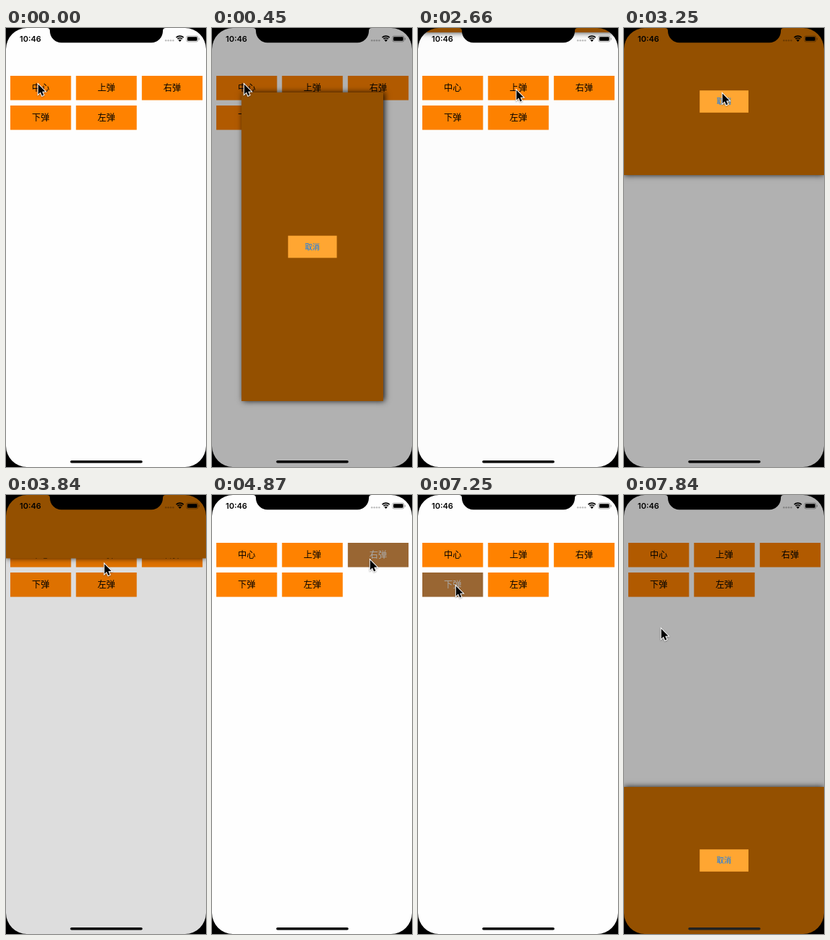
These frames come from a looping animation (278x606 px, 7990 ms). An HTML page with a canvas:

```html
<!DOCTYPE html>
<html lang="zh-CN">
<head>
<meta charset="utf-8">
<title>弹窗</title>
<style>
html, body { margin: 0; width: 100%; height: 100%; overflow: hidden; background: #000; }
canvas { display: block; width: 278px; height: 606px; }
</style>
</head>
<body>
<canvas id="stage"></canvas>
<script>
const W = 278, H = 606;
const LOOP = 7990, TICK = 147.96, LAST = 53;
const SLIDE = 1.25; // slide length in ticks
const CJK = '"Noto Sans CJK SC", "Noto Sans CJK", sans-serif';

const canvas = document.getElementById('stage');
const ctx = canvas.getContext('2d');
const dpr = window.devicePixelRatio || 1;
canvas.width = W * dpr;
canvas.height = H * dpr;

// press: tick at which the button is held down
const buttons = [
  { label: '中心', x: 6, y: 66 },
  { label: '上弹', x: 97.3, y: 66, press: 17 },
  { label: '右弹', x: 188.8, y: 66, press: 33 },
  { label: '下弹', x: 6, y: 107, press: 49 },
  { label: '左弹', x: 97.3, y: 107 }
];

// dx, dy: direction each panel slides in from; all times in ticks
const panels = [
  { x: 41, y: 89, w: 197, h: 426, dx: 0, dy: 0, open: 1.4, close: 9.33 },
  { x: 0, y: 0, w: W, h: 203, dx: 0, dy: -1, open: 17.847, close: 25.33 },
  { x: 144, y: 0, w: 134, h: H, dx: 1, dy: 0, open: 33.847, close: 43.33 },
  { x: 0, y: 403, w: W, h: 203, dx: 0, dy: 1, open: 49, close: 99 }
];

// cursor path: tick, x, y
const path = [
  [4, 43, 76], [8, 136, 293], [10, 136, 296], [16, 135, 84],
  [21, 135, 84], [23, 135, 93.5], [27, 135, 93.5], [32, 218, 88],
  [37, 218, 88], [39, 207, 269], [41, 208, 297], [44, 208, 297],
  [48.6, 51, 124], [52, 51, 124], [53, 50, 183]
];

const clamp = v => Math.max(0, Math.min(1, v));
const ease = v => v < 0.5 ? 2 * v * v : 1 - 2 * (1 - v) * (1 - v);
const smooth = v => v * v * (3 - 2 * v);
const held = (k, at) => Math.abs(k - at) < 0.5;
const progress = (k, p) =>
  ease(clamp((k - p.open) / SLIDE)) - ease(clamp((k - p.close) / SLIDE));

function rect(x, y, w, h, color) {
  ctx.fillStyle = color;
  ctx.fillRect(x, y, w, h);
}

function pill(x, y, w, h, r, color) {
  ctx.beginPath();
  ctx.roundRect(x, y, w, h, r);
  ctx.fillStyle = color;
  ctx.fill();
}

function text(str, x, y, font, color) {
  ctx.font = font;
  ctx.fillStyle = color;
  ctx.textAlign = 'center';
  ctx.textBaseline = 'alphabetic';
  ctx.fillText(str, x, y);
}

function drawButton(b, k) {
  const down = held(k, b.press);
  rect(b.x, b.y, 84.4, 33.6, down ? '#996633' : '#ff8200');
  text(b.label, b.x + 42.2, b.y + 21.4, '12.2px ' + CJK, down ? '#aaa' : '#000');
}

function drawPanel(p, k) {
  const v = progress(k, p);
  if (v <= 0) return;
  const fades = !p.dx && !p.dy;
  const x = p.x + p.dx * p.w * (1 - v);
  const y = p.y + p.dy * p.h * (1 - v);
  const cx = x + p.w / 2, cy = y + p.h / 2;

  rect(0, 0, W, H, `rgba(0,0,0,${0.305 * v})`);
  ctx.save();
  if (fades) ctx.globalAlpha = v;
  ctx.save();
  ctx.shadowColor = 'rgba(0,0,0,0.85)';
  ctx.shadowBlur = 8 * dpr;
  ctx.shadowOffsetX = fades ? 2 * dpr : 0;
  rect(x, y, p.w, p.h, '#945000');
  ctx.restore();
  rect(cx - 33.8, cy - 15.3, 67.8, 30.6, '#ffa632');
  if (held(k, p.close - 0.33)) ctx.globalAlpha *= 0.2;
  text('取消', cx, cy + 3.8, '10.2px ' + CJK, '#007aff');
  ctx.restore();
}

function drawStatus() {
  text('10:46', 34, 18.8, '600 11px Inter, sans-serif', '#000');

  ctx.fillStyle = 'rgba(0,0,0,0.25)';
  for (let i = 0; i < 4; i++) {
    ctx.beginPath();
    ctx.arc(222.2 + i * 3.4, 17.2, 1.25, 0, 7);
    ctx.fill();
  }

  ctx.strokeStyle = '#000';
  ctx.lineWidth = 1.7;
  for (const r of [7.4, 4.7]) {
    ctx.beginPath();
    ctx.arc(241.7, 18.5, r, -2.33, -0.81);
    ctx.stroke();
  }
  ctx.beginPath();
  ctx.moveTo(241.7, 19);
  ctx.arc(241.7, 19, 3.2, -2.33, -0.81);
  ctx.fillStyle = '#000';
  ctx.fill();

  ctx.beginPath();
  ctx.roundRect(250.9, 11, 16, 8, 2.2);
  ctx.strokeStyle = 'rgba(0,0,0,0.4)';
  ctx.lineWidth = 0.8;
  ctx.stroke();
  pill(252.1, 12.2, 13.6, 5.6, 1.2, '#000');
  pill(267.8, 13.6, 1, 2.8, 0.5, 'rgba(0,0,0,0.4)');
}

function drawBezel(k) {
  // notch with flared top corners
  ctx.beginPath();
  ctx.moveTo(57, 0);
  ctx.quadraticCurveTo(61, 0, 61, 4);
  ctx.arcTo(61, 20.3, 77, 20.3, 16);
  ctx.arcTo(218, 20.3, 218, 4, 16);
  ctx.lineTo(218, 4);
  ctx.quadraticCurveTo(218, 0, 222, 0);
  ctx.fillStyle = '#000';
  ctx.fill();

  ctx.beginPath();
  ctx.rect(0, 0, W, H);
  ctx.roundRect(0, 0, W, H, 29);
  ctx.fill('evenodd');

  const tone = Math.round(34 * Math.max(progress(k, panels[2]), progress(k, panels[3])));
  pill(89.3, 597, 100.4, 3.6, 1.8, `rgb(${tone},${tone},${tone})`);
}

function cursorAt(k) {
  const i = path.findIndex(p => p[0] > k);
  if (i === 0) return path[0].slice(1);
  if (i < 0) return path[path.length - 1].slice(1);
  const [t0, x0, y0] = path[i - 1], [t1, x1, y1] = path[i];
  const v = smooth((k - t0) / (t1 - t0));
  return [x0 + (x1 - x0) * v, y0 + (y1 - y0) * v];
}

function drawCursor(k) {
  const [x, y] = cursorAt(k);
  ctx.save();
  ctx.translate(x + 1.8, y + 1.8);
  ctx.beginPath();
  ctx.moveTo(0, 0);
  for (const [px, py] of [[0, 13.6], [3.1, 10.7], [5.3, 15.8], [7.6, 14.8], [5.4, 9.9], [9.7, 9.8]]) {
    ctx.lineTo(px, py);
  }
  ctx.closePath();
  ctx.lineWidth = 2;
  ctx.strokeStyle = '#fff';
  ctx.save();
  ctx.shadowColor = 'rgba(0,0,0,0.4)';
  ctx.shadowBlur = 2 * dpr;
  ctx.shadowOffsetY = 0.7 * dpr;
  ctx.stroke();
  ctx.restore();
  ctx.fillStyle = '#000';
  ctx.fill();
  ctx.restore();
}

function draw(k) {
  ctx.setTransform(dpr, 0, 0, dpr, 0, 0);
  rect(0, 0, W, H, '#fefefe');
  buttons.forEach(b => drawButton(b, k));
  panels.forEach(p => drawPanel(p, k));
  drawStatus();
  drawBezel(k);
  drawCursor(k);
}

const start = performance.now();

// the picture advances in whole ticks, like a slow screen recording
function loop() {
  const t = (performance.now() - start) % LOOP;
  draw(Math.min(LAST, Math.floor((t + 13) / TICK)));
  requestAnimationFrame(loop);
}
loop();
</script>
</body>
</html>
```
